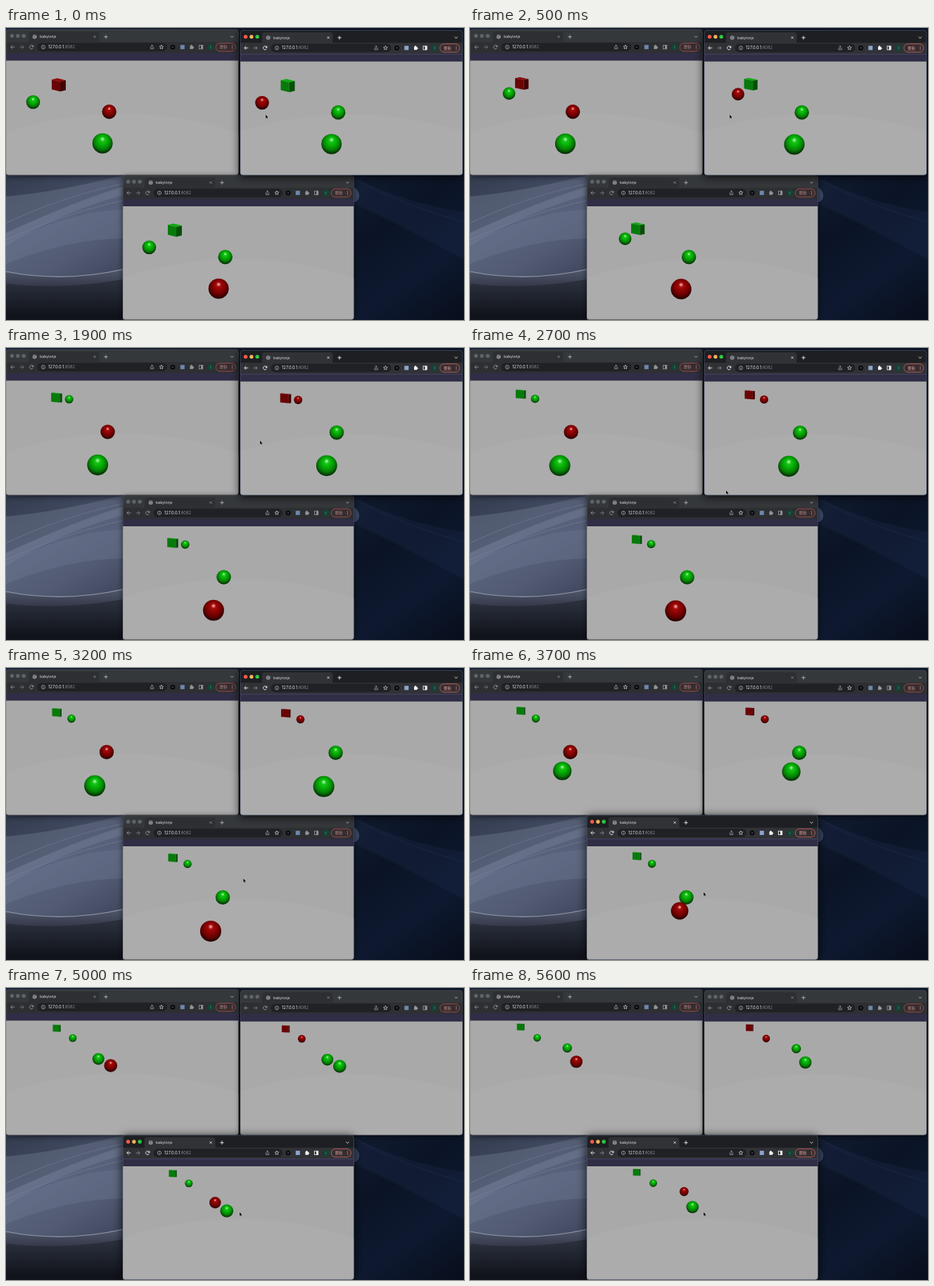
These frames come from a looping animation (651x416 px, 5700 ms). An HTML page with a canvas:

```html
<!DOCTYPE html>
<html lang="en">
<head>
<meta charset="utf-8">
<title>babylonjs</title>
<style>
html, body { margin: 0; width: 100%; height: 100%; overflow: hidden; background: #0c1424; }
canvas { display: block; }
</style>
</head>
<body>
<canvas id="stage" width="651" height="416"></canvas>
<script>
const g = document.getElementById('stage').getContext('2d');
const LOOP = 5700, STEP = 100, LAG = 90, FOCUS_SWITCH = 3300, PUSH = 700;
const SANS = 'Inter, Roboto, sans-serif';
const CJK = '"Noto Sans CJK SC", "Noto Sans CJK JP", "Noto Sans CJK", sans-serif';

// Windows: left origin, top, right edge, bottom, visible left edge, scene offset
const windows = [
  { x: 0, y: 2, right: 330.5, bottom: 209.5, left: 0, sx: 0, sy: 0 },
  { x: 332, y: 3.2, right: 649, bottom: 209.5, left: 333, sx: 325.5, sy: 1 },
  { x: 165, y: 209.7, right: 494.5, bottom: 415.5, left: 166, sx: 165, sy: 207 }
];

// Motion keys: time, x, y, radius
const small = [[0, 38.5, 105.5, 9.8], [1000, 72.5, 81, 8], [1600, 87.5, 74.2, 6.5],
  [1900, 89.7, 73, 6], [2700, 92.5, 72.4, 5.9], [5600, 95.5, 71, 5.4]];
const middle = [[0, 146.7, 119.2, 10.2], [3700, 142.5, 119.8, 10.2], [4050, 143, 119.3, 10.2],
  [4400, 145.5, 115, 9.8], [4800, 148, 112.3, 9.5], [5600, 151.2, 105, 8.8]];
const large = [[0, 137.2, 164.3, 14.4], [1000, 133, 165.6, 14.8], [2700, 127.3, 167.6, 15],
  [3350, 125.5, 168, 15], [3600, 131, 147.5, 13.2], [3700, 133, 139, 12.4], [3950, 131, 131, 11.4],
  [4200, 127, 123.5, 10.7], [4400, 126.5, 115.5, 10], [4800, 130, 104, 8.8], [5600, 139.3, 83, 6.4]];
// Cube keys: time, x, y, side, yaw, tilt
const cube = [[0, 75, 81, 14.4, .59, .25], [1000, 72.3, 77, 14, .38, .17], [1900, 72, 70.6, 12.6, .28, .11],
  [2700, 72.2, 65.7, 11.8, .26, .09], [3700, 72.3, 61, 10.6, .2, .06], [5600, 72, 55.6, 9.3, .16, .03]];
const pointer = [[0, 369, 123.5], [1300, 369, 123.5], [1900, 361, 132], [2700, 364, 203], [3300, 332, 319.5]];

function at(keys, t) {
  const i = keys.findIndex(k => k[0] > t);
  if (i < 0) return keys[keys.length - 1].slice(1);
  if (i === 0) return keys[0].slice(1);
  const a = keys[i - 1], b = keys[i], f = (t - a[0]) / (b[0] - a[0]);
  return a.slice(1).map((v, j) => v + (b[j + 1] - v) * f);
}

function linear(x0, y0, x1, y1, ...stops) {
  const grad = g.createLinearGradient(x0, y0, x1, y1);
  stops.forEach((c, i) => grad.addColorStop(i / (stops.length - 1), c));
  return grad;
}
function rect(x, y, w, h, color) { g.fillStyle = color; g.fillRect(x, y, w, h); }
function pill(x, y, w, h, r, color) {
  g.beginPath(); g.roundRect(x, y, w, h, r); g.fillStyle = color; g.fill();
}
function disc(x, y, r, color) {
  g.beginPath(); g.arc(x, y, r, 0, 7); g.fillStyle = color; g.fill();
}
function shape(path, color) { g.fillStyle = color; g.fill(new Path2D(path)); }
function line(path, color, width = .9) {
  g.strokeStyle = color; g.lineWidth = width; g.stroke(new Path2D(path));
}
function text(s, x, y, size, color, font = SANS, weight = 400) {
  g.font = `${weight} ${size}px ${font}`;
  g.fillStyle = color;
  g.textBaseline = 'middle';
  g.fillText(s, x, y);
}

function wallpaper() {
  rect(0, 0, 651, 416, linear(0, 0, 651, 0, '#16243f', '#101a30', '#0d182f'));
  rect(0, 205, 170, 211, linear(0, 210, 110, 400, '#3b4357', '#5d667f', '#535b74', '#3a4157'));
  shape('M0 212L60 209H166V226Q90 250 0 292Z', '#2f374b99');
  shape('M0 240Q70 234 166 210V238Q80 262 0 310Z', '#7882995c');
  shape('M0 306Q90 262 166 258V300Q90 300 0 336Z', '#77809a45');
  line('M0 278Q80 240 166 222M0 302Q90 262 166 246', '#8b94ab55', 1.2);
  shape('M0 347Q80 362 166 343V416H0Z', linear(0, 345, 0, 416, '#50576b', '#242936', '#12151d'));
  line('M0 347Q80 363 166 344', '#949caf', 1.2);
  shape('M0 364Q80 374 166 358V416H0Z', linear(0, 362, 0, 410, '#2b303d', '#10131a'));
  rect(490, 205, 161, 211, linear(495, 210, 640, 416, '#111b30', '#0b1426', '#0e1930', '#080e1c'));
  shape('M494 213Q570 250 651 262V330Q560 280 494 250Z', '#1a274466');
  line('M494 214Q570 256 651 276', '#24324f80', 1);
  shape('M494 226Q505 234 501 244Q498 248 494 249Z', '#3a4663');
}

function chrome(w, active) {
  const { x, y, right, left } = w;
  const ink = active ? '#f1f3f4' : '#929599', dim = active ? '#8b8e92' : '#777a7e';
  const bar = active ? '#303236' : '#2d2f32', wide = right - left;
  rect(left, y, wide, 18, active ? '#1d1f22' : '#35383b');
  rect(left, y + 18, wide, 16, bar);
  rect(left, y + 34, wide, 10.5, '#302d47');
  if (active) rect(left, y + 33.6, wide, .8, '#4b4a6c');

  ['#f4584f', '#edb352', '#30c543'].forEach((c, i) =>
    disc(x + 8.6 + i * 8.3, y + 9.3, 2.7, active ? c : '#606367'));

  pill(x + 32, y + 3, 100.5, 20, 4, bar);
  disc(x + 40.7, y + 10.6, 3, '#8f9296');
  line(`M${x + 38.3} ${y + 9.6}l2.4 1.2 .6 2M${x + 40} ${y + 8}l2.6 1.6`, '#42454a', .8);
  text('babylonjs', x + 48, y + 10.9, 5.2, '#dfe1e5');
  line(`M${x + 124.6} ${y + 9}l3 3m0 -3l-3 3`, ink, .8);
  line(`M${x + 139.3} ${y + 10.6}h5.4m-2.7 -2.7v5.4`, active ? '#f1f3f4' : '#b5b7ba');
  line(`M${right - 11.3} ${y + 9.3}l2.2 2.2 2.2 -2.2`, active ? '#e3e5e8' : '#b9bbbe');

  const m = y + 25.2;
  line(`M${x + 12.3} ${m}h-5.4m2.5 -2.6l-2.6 2.6 2.6 2.6`, ink);
  line(`M${x + 19.7} ${m}h5.4m-2.5 -2.6l2.6 2.6 -2.6 2.6`, dim);
  g.beginPath();
  g.arc(x + 36.2, m, 2.6, .5, 5.6);
  g.strokeStyle = ink; g.lineWidth = .9; g.stroke();
  shape(`M${x + 39.3} ${m - 3.2}v3h-3z`, ink);

  pill(x + 44.5, m - 6, right - x - 146, 12, 6, '#1f2124');
  g.beginPath();
  g.arc(x + 53, m, 2.6, 0, 7);
  g.strokeStyle = '#b8babe'; g.lineWidth = .7; g.stroke();
  line(`M${x + 53} ${m - .4}v1.8m0 -3.2v.7`, '#b8babe', .8);
  text('127.0.0.1', x + 60, m + .2, 5.8, '#e8eaed');
  const host = g.measureText('127.0.0.1').width;
  text(':8082', x + 60 + host, m + .2, 5.8, '#85898e');

  const at = d => right - d;
  line(`M${at(125)} ${m - .5}v3h4.2v-3M${at(122.9)} ${m + 1}v-4m-1.3 1.2l1.3 -1.3 1.3 1.3`, '#b5b8bc', .7);
  let star = '';
  for (let i = 0; i < 10; i++) {
    const a = -Math.PI / 2 + i * Math.PI / 5, r = i % 2 ? 1.4 : 3;
    star += `${i ? 'L' : 'M'}${at(109.6) + r * Math.cos(a)} ${m + r * Math.sin(a)}`;
  }
  line(star + 'Z', '#c8cace', .8);
  disc(at(93.5), m, 3.5, '#0a0b0c');
  disc(at(93.5), m, .8, '#777a7e');
  rect(at(82.7), m - 3, 6, 6, active ? '#8ba6cf' : '#6d87ad');
  rect(at(69), m - 1.7, 4.3, 4.5, ink);
  disc(at(67), m - 2, 1.2, ink);
  disc(at(64.6), m + .5, 1.2, ink);
  g.strokeStyle = ink; g.lineWidth = .9; g.strokeRect(at(56), m - 2.6, 5.2, 5.2);
  rect(at(53.4), m - 2.6, 2.6, 5.2, ink);
  disc(at(39.7), m, 4.7, '#154236');
  text('i', at(40.4), m + .2, 5, '#80bd9c');

  g.beginPath();
  g.roundRect(at(32.2), m - 5.7, 28, 11.6, 5.8);
  g.fillStyle = '#352d30'; g.fill();
  g.strokeStyle = active ? '#c76661' : '#a6524f'; g.lineWidth = .9; g.stroke();
  text('更新', at(27), m, 5.6, active ? '#e5a09b' : '#bd8581', CJK, 500);
  for (let i = -1; i < 2; i++) disc(at(9), m + i * 2, .65, '#df8a85');
}

function sphere([x, y, r], red) {
  const body = g.createRadialGradient(x, y - r * .4, r * .08, x, y - r * .15, r * 1.12);
  const tones = red ? ['#b01010', '#910404', '#690000', '#230000'] : ['#22cc22', '#06b306', '#067f06', '#032c03'];
  tones.forEach((c, i) => body.addColorStop([0, .35, .7, 1][i], c));
  disc(x, y, r, body);
  const glint = g.createRadialGradient(x, y - r * .42, 0, x, y - r * .42, r * .24);
  const tint = red ? '255,205,205' : '185,255,185';
  glint.addColorStop(0, `rgba(${tint},.9)`);
  glint.addColorStop(1, `rgba(${tint},0)`);
  disc(x, y - r * .42, r * .24, glint);
}

function box([x, y, side, yaw, tilt], red) {
  const c = Math.cos(yaw) * side, s = Math.sin(yaw) * side, k = Math.sin(tilt);
  const h = side * Math.cos(tilt);
  const x0 = x - (c + s) / 2, y0 = y - h / 2 + (c - s) * -k / 2;
  const l = [x0, y0 + s * 0], f = [x0 + c, y0 + c * k], r = [x0 + c + s, y0 + (c - s) * k], b = [x0 + s, y0 - s * k];
  const face = (pts, color) => shape('M' + pts.map(p => p.join(' ')).join('L') + 'Z', color);
  const down = p => [p[0], p[1] + h];
  const [top, front, edge] = red ? ['#8e0909', '#6b0505', '#420202'] : ['#0fab14', '#087a0b', '#045006'];
  face([l, f, r, b], top);
  face([l, f, down(f), down(l)], front);
  face([f, r, down(r), down(f)], edge);
}

function scene(w, i, t) {
  const top = w.y + 44.3;
  g.save();
  g.beginPath();
  g.rect(w.left, top, w.right - w.left, w.bottom - top);
  g.clip();
  rect(w.left, top, 340, 170, '#a9a9a9');
  g.beginPath();
  g.ellipse(w.sx + 165, w.sy + 330, 330, 208, 0, 0, 7);
  g.fillStyle = '#acacac'; g.fill();
  g.translate(w.sx, w.sy);
  box(at(cube, t), i === (t < PUSH ? 0 : 1));
  const balls = [
    [at(middle, t), i === 0],
    [at(small, t), i === 1],
    [at(large, i === 2 ? t : Math.max(0, t - LAG)), i === 2]
  ];
  balls.sort((a, b) => a[0][1] - b[0][1]).forEach(b => sphere(...b));
  g.restore();
}

function drawWindow(w, i, t, active) {
  const wide = w.right - w.left, high = w.bottom - w.y;
  g.save();
  g.shadowColor = active ? '#000d' : '#0009';
  g.shadowBlur = active ? 14 : 8;
  g.shadowOffsetY = 2;
  pill(w.left, w.y, wide, high, 4, '#303236');
  g.restore();
  g.save();
  g.beginPath();
  g.roundRect(w.left, w.y, wide, high, 4);
  g.clip();
  chrome(w, active);
  scene(w, i, t);
  g.restore();
  g.beginPath();
  g.roundRect(w.left + .2, w.y + .2, wide - .4, high - .4, 4);
  g.strokeStyle = active ? '#65749399' : '#63666a88';
  g.lineWidth = .7; g.stroke();
}

function cursor([x, y]) {
  const arrow = `M${x} ${y}v5l1.2 -1 .9 1.8 .9 -.4 -.8 -1.7h1.5z`;
  line(arrow, '#dddddd99', .7);
  shape(arrow, '#111');
}

let last = -1;
function frame(now) {
  const t = Math.floor(now % LOOP / STEP) * STEP;
  if (t !== last) {
    last = t;
    const focus = t < FOCUS_SWITCH ? 1 : 2;
    wallpaper();
    [0, 1, 2].sort((a, b) => (a === focus) - (b === focus))
      .forEach(i => drawWindow(windows[i], i, t, i === focus));
    cursor(at(pointer, t));
  }
  requestAnimationFrame(frame);
}
frame(0);
</script>
</body>
</html>
```
